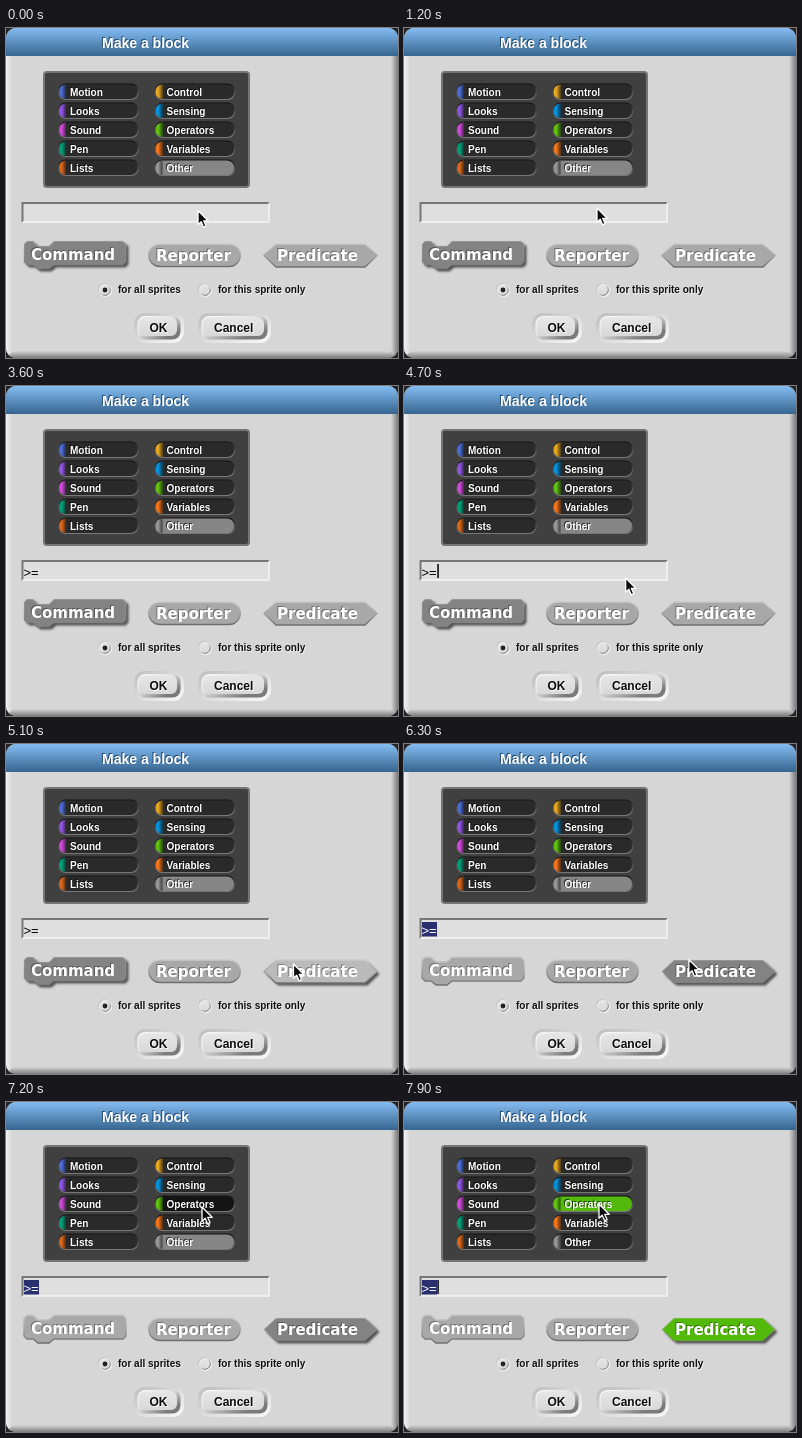
Animation of 392x330 px, one loop 8 s. Source, as an HTML page:

```html
<!DOCTYPE html>
<html lang="en">
<head>
<meta charset="utf-8">
<title>Make a block</title>
<style>
html, body { margin: 0; width: 100%; height: 100%; overflow: hidden; background: #262626; }
svg { display: block; width: 392px; height: 330px; }
text { font-family: "Liberation Sans", Arial, sans-serif; font-weight: bold; white-space: pre; }
.title { font-size: 14px; }
.small { font-size: 10px; }
.btn { font-size: 12px; }
.block { font: bold 15px "DejaVu Sans", Verdana, sans-serif; }
#typed { font-size: 13px; font-weight: normal; }
.off { display: none; }
.cat { --face: #2a2a2a; }
.cat.hover { --face: #141414; }
.cat.on { --face: var(--press); }
.cat .face { fill: var(--face); }
.kind .face { fill: #a8a8a8; }
.kind.hover .face { fill: #bababa; }
.kind.on .face { fill: var(--ink, #838383); }
.kind .drop { display: none; }
.kind.on .drop, .kind.hover .drop { display: inline; }
.kind.on .rim { opacity: .35; }
</style>
</head>
<body>
<svg id="stage" viewBox="0 0 392 330">
  <defs>
    <linearGradient id="bar" x2="0" y2="1">
      <stop stop-color="#84bcf2"/><stop offset="1" stop-color="#36658f"/>
    </linearGradient>
    <linearGradient id="left">
      <stop stop-color="#f2f2f2"/><stop offset="1" stop-color="#d6d6d6"/>
    </linearGradient>
    <linearGradient id="right">
      <stop stop-color="#d6d6d6"/><stop offset="1" stop-color="#7c7c7c"/>
    </linearGradient>
    <linearGradient id="bottom" x2="0" y2="1">
      <stop stop-color="#d6d6d6"/><stop offset="1" stop-color="#7c7c7c"/>
    </linearGradient>
    <linearGradient id="ring" x2="1" y2="1">
      <stop stop-color="#bdbdbd"/><stop offset="1" stop-color="#fafafa"/>
    </linearGradient>
    <linearGradient id="bevel" x2="1" y2="1">
      <stop stop-color="#fcfcfc"/><stop offset=".4" stop-color="#e4e4e4"/><stop offset=".8" stop-color="#7a7a7a"/>
    </linearGradient>
    <linearGradient id="face" x2="0" y2="1">
      <stop stop-color="#e6e6e6"/><stop offset="1" stop-color="#d8d8d8"/>
    </linearGradient>
    <linearGradient id="pill" x2="0" y2="1">
      <stop stop-color="#101010"/><stop offset=".5" stop-color="#4c4c4c"/><stop offset="1" stop-color="#7a7a7a"/>
    </linearGradient>
    <linearGradient id="shade">
      <stop stop-color="#000" stop-opacity="0"/><stop offset=".4" stop-color="#000" stop-opacity="0"/>
      <stop offset="1" stop-color="#000" stop-opacity=".6"/>
    </linearGradient>
    <linearGradient id="rim" x2="0" y2="1">
      <stop stop-color="#cacaca"/><stop offset=".5" stop-color="#a4a4a4"/><stop offset="1" stop-color="#6e6e6e"/>
    </linearGradient>
    <filter id="blur" x="-10%" y="-30%" width="120%" height="160%"><feGaussianBlur stdDeviation="1"/></filter>
    <clipPath id="window"><rect width="392" height="330" rx="10"/></clipPath>
  </defs>

  <g clip-path="url(#window)">
    <rect width="392" height="330" fill="#d6d6d6"/>
    <rect y="28" width="6" height="302" fill="url(#left)"/>
    <rect x="385" y="28" width="7" height="302" fill="url(#right)"/>
    <path d="M0 330l7-7h378l7 7z" fill="url(#bottom)"/>
    <rect width="392" height="28" fill="url(#bar)"/>
  </g>

  <rect x="38" y="44" width="205" height="115" rx="3" fill="#404040" stroke="#757575" stroke-width="2"/>
  <g id="cats"></g>

  <rect x="15.500" y="174" width="248.500" height="21" fill="#dfdfdf"/>
  <path d="M15.500 174h248.500l-2 2h-244.500v17l-2 2z" fill="#767676"/>
  <path d="M264 174v21h-248.500l2-2h244.500v-17z" fill="#eeeeee"/>
  <rect id="mark" x="18" y="178" width="15" height="14.500" fill="#2a2f70"/>
  <text id="typed" x="17.500" y="190.500"></text>
  <rect id="caret" y="178" width="1.500" height="14" fill="#000"/>

  <g id="kinds"></g>
  <g id="options"></g>
  <g id="labels"></g>

  <path id="cursor" d="M0 0v14.200l3.200-3 2.400 5.600 2.500-1.100-2.400-5.400h4.500z"
        fill="#0a0a0a" stroke="#fff" stroke-width="1.300" stroke-linejoin="round"/>
</svg>
<script>
const $ = id => document.getElementById(id);

function add(parent, tag, attrs, content) {
  const el = document.createElementNS("http://www.w3.org/2000/svg", tag);
  for (const k in attrs) el.setAttribute(k, attrs[k]);
  if (content) el.textContent = content;
  parent.append(el);
  return el;
}

// Text with a hard shadow behind it
function label(parent, x, y, text, cls, fill, shadow, d = -1) {
  add(parent, "text", { x: x + d, y: y + d, class: cls, fill: shadow, "aria-hidden": true }, text);
  add(parent, "text", { x, y, class: cls, fill }, text);
}

const GREEN = "#53ba0c";
const cats = {};
const columns = [
  [52, [["Motion", "#4a6cd4"], ["Looks", "#8f56e3"], ["Sound", "#cf4ad9"], ["Pen", "#00a178"], ["Lists", "#d9661a"]]],
  [148.5, [["Control", "#e6a822"], ["Sensing", "#0494dc"], ["Operators", "#62c213"], ["Variables", "#f3761d"], ["Other", "#969696"]]]
];
columns.forEach(([x, rows]) => rows.forEach(([name, color], i) => {
  const y = 56 + i * 19;
  const tip = `M${x + 8} ${y + .5}v14.500q-7-1-7-7.250t7-7.250z`;
  const el = add($("cats"), "g", { class: "cat", style: `--press:${name === "Operators" ? GREEN : "#868686"}` });
  add(el, "rect", { x, y: y - .5, width: 81, height: 16.5, rx: 8, fill: "url(#pill)" });
  add(el, "rect", { class: "face", x: x + 1, y: y + .5, width: 78.5, height: 14.5, rx: 7.2 });
  add(el, "path", { d: tip, fill: color });
  add(el, "path", { d: tip, fill: "url(#shade)" });
  label(el, x + 12, y + 11.8, name, "small", "#fff", "#000a");
  cats[name] = { el, x, y };
}));

const kinds = {};
[
  ["Command", 25, 232, "M18 216l3-3h6l5 5h11l5-5h69l3 3v18l-3 3h-69l-5 4h-11l-5-4h-6l-3-3z"],
  ["Reporter", 150, 233, "M154 216h69a11 11 0 0 1 0 22.500h-69a11 11 0 0 1 0-22.500z"],
  ["Predicate", 271, 232.7, "M258 227.500l12-11.500h89l12 11.500-12 11.500h-89z"]
].forEach(([name, x, y, d]) => {
  const el = add($("kinds"), "g", { class: "kind" });
  add(el, "path", { class: "drop", d, fill: "#333", opacity: .8, transform: "translate(2.5 2.5)", filter: "url(#blur)" });
  add(el, "path", { class: "face", d });
  add(el, "path", { class: "rim", d, fill: "none", stroke: "url(#rim)", "stroke-width": 1.4 });
  label(el, x, y, name, "block", "#fff", "#0005");
  kinds[name] = el;
});

function radio(x, text, on) {
  const g = $("options");
  add(g, "circle", { cx: x, cy: 262, r: 6.5, fill: "url(#face)", stroke: "url(#ring)", "stroke-width": 1.5 });
  add(g, "circle", { cx: x, cy: 262, r: 5.3, fill: "none", stroke: "url(#bevel)", "stroke-width": 1 });
  if (on) add(g, "circle", { cx: x, cy: 262, r: 2.4, fill: "#222" });
  label(g, x + 13, 265, text, "small", "#111", "#eee", 1);
}
radio(99, "for all sprites", true);
radio(199, "for this sprite only", false);

function button(x, w, tx, text) {
  const g = $("options");
  add(g, "rect", { x, y: 285, width: w, height: 30, rx: 11, fill: "url(#ring)" });
  add(g, "rect", { x: x + 3.5, y: 288, width: w - 7, height: 23.5, rx: 8, fill: "url(#bevel)" });
  add(g, "rect", { x: x + 5, y: 289.5, width: w - 12, height: 18.5, rx: 6, fill: "url(#face)" });
  label(g, tx, 304, text, "btn", "#0c0c0c", "#fff", 1);
}
button(128, 50, 143.5, "OK");
button(192, 73, 208, "Cancel");
label($("labels"), 96, 19.5, "Make a block", "title", "#fff", "#234a70");

// Pointer path: time, x, y
const path = [
  [0, 192, 182.5], [900, 192, 182.5], [1000, 193, 180], [4500, 193, 180],
  [4800, 236, 198], [5100, 287.5, 220], [5200, 288, 221], [6200, 288, 221],
  [6600, 275.5, 199], [7100, 197, 108], [7200, 196, 105], [7300, 195, 102], [8000, 195, 102]
];

function pointer(t) {
  const i = path.findIndex(p => p[0] > t);
  const [a, b] = [path[i - 1], path[i]];
  const k = (t - a[0]) / (b[0] - a[0]);
  return [a[1] + (b[1] - a[1]) * k, a[2] + (b[2] - a[2]) * k];
}

function caretOn(t) {
  if (t >= 3000 && t < 3200) return false;
  if (t >= 2400 && t < 3600) return true;
  return Math.floor(t / 600) % 2 === 1;
}

const LOOP = 8000, STEP = 100;

function draw(ms) {
  const t = Math.floor(ms % LOOP / STEP) * STEP;
  const [x, y] = pointer(t);
  const shown = t < 2400 || t >= 4600;
  const text = t < 2400 ? "" : t < 3200 ? ">" : ">=";
  const marked = t >= 5500;

  $("cursor").setAttribute("transform", `translate(${x} ${y})`);
  $("cursor").classList.toggle("off", !shown);
  $("typed").textContent = text;
  $("typed").setAttribute("fill", marked ? "#fff" : "#000");
  $("mark").classList.toggle("off", !marked);
  $("caret").setAttribute("x", 18.5 + 7.4 * text.length);
  $("caret").classList.toggle("off", !caretOn(t));

  for (const name in cats) {
    const c = cats[name];
    const over = shown && x > c.x && x < c.x + 81 && y > c.y && y < c.y + 16;
    c.el.classList.toggle("hover", over);
    c.el.classList.toggle("on", name === "Operators" ? t >= 7600 : name === "Other" && t < 7700);
  }
  kinds.Command.classList.toggle("on", t < 5500);
  kinds.Predicate.classList.toggle("on", t >= 5400);
  kinds.Predicate.classList.toggle("hover", shown && x > 262 && y > 215);
  kinds.Predicate.style.setProperty("--ink", t >= 7700 ? GREEN : "#838383");
}

const start = performance.now();
function frame() {
  draw(performance.now() - start);
  requestAnimationFrame(frame);
}
frame();
</script>
</body>
</html>
```
